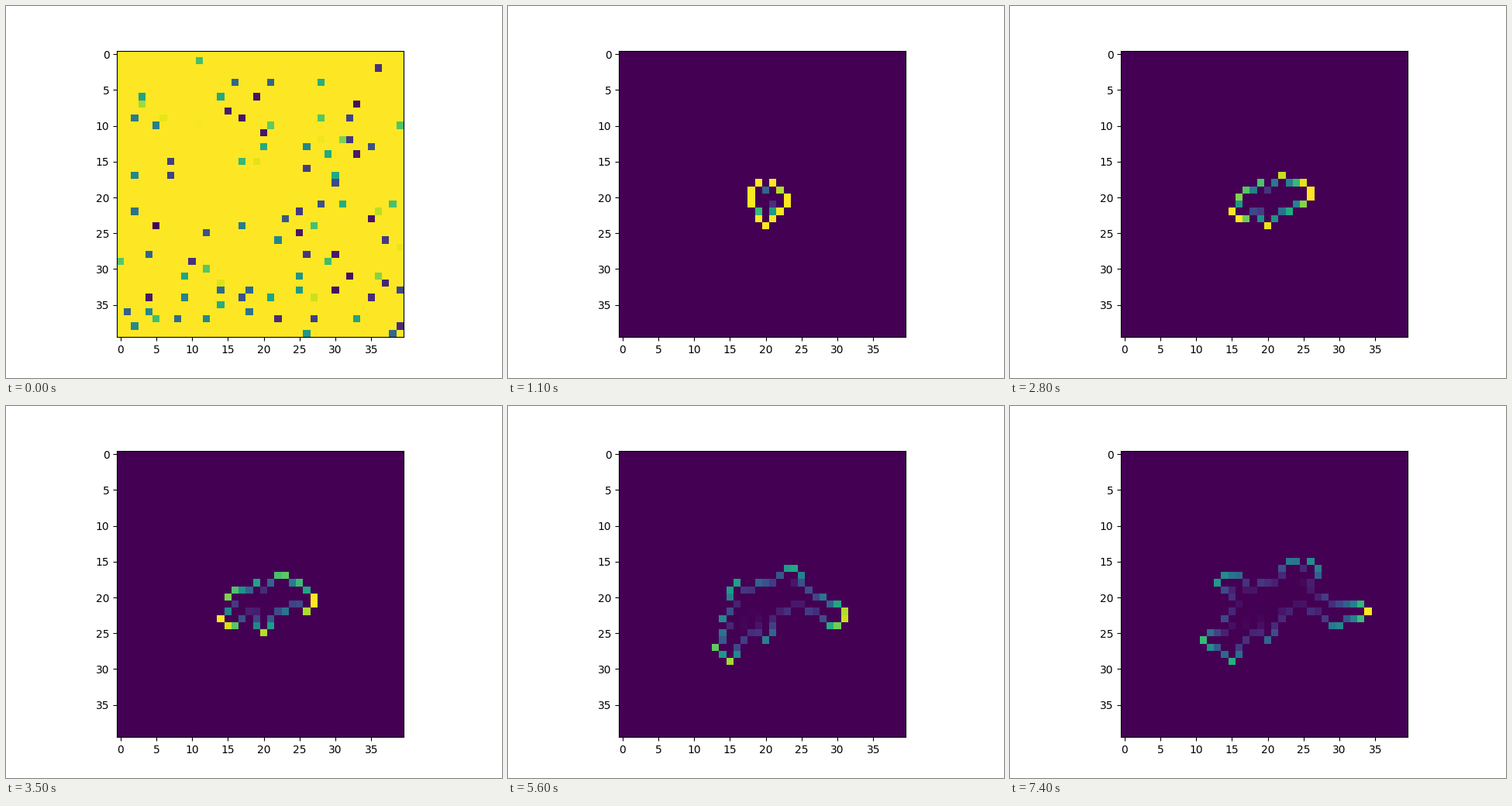
These frames come from a looping animation (640x480 px, 7.5 s). A matplotlib script:

```python
import numpy as np
import matplotlib.pyplot as plt
from matplotlib.animation import FuncAnimation

# Dielectric breakdown growth: each cell next to the cluster is coloured
# by its chance of being the next one to join.
SIZE = 40
FRAMES = 75
VMAX = 0.06

# Limbs of the cluster: first frame, last frame, then the (column, row)
# corners that the limb passes at an even pace.
LIMBS = [
    (1, 10, (20, 20), (20, 23)),
    (2, 22, (21, 20), (22, 21), (23, 20), (24, 20)),
    (7, 31, (19, 20), (16, 20)),
    (9, 33, (19, 21), (17, 22), (16, 23), (15, 23)),
    (10, 47, (19, 19), (20, 19)),
    (11, 54, (21, 19), (25, 20), (26, 21), (28, 22), (30, 23), (29, 23)),
    (15, 73, (21, 22), (21, 23)),
    (27, 72, (22, 18), (23, 17), (26, 16)),
    (33, 37, (20, 24), (20, 25)),
    (40, 55, (16, 24), (16, 26), (15, 28)),
    (44, 48, (17, 25), (15, 25)),
    (56, 65, (16, 19), (16, 18), (14, 18)),
    (56, 70, (14, 27), (14, 26), (12, 26)),
    (57, 73, (31, 22), (33, 22)),
    (65, 68, (23, 16), (24, 16)),
]


def walk(corners):
    """Cells from corner to corner, across first and then down or up."""
    x, y = corners[0]
    cells = [(x, y)]
    for end_x, end_y in corners[1:]:
        while (x, y) != (end_x, end_y):
            if x != end_x:
                x += np.sign(end_x - x)
            else:
                y += np.sign(end_y - y)
            cells.append((x, y))
    return cells


def join_times():
    """Grid of the moments at which cells join the cluster."""
    joined = np.full((SIZE, SIZE), np.inf)
    for start, end, *corners in LIMBS:
        cells = walk(corners)
        for (x, y), t in zip(cells, np.linspace(start, end, len(cells))):
            joined[y, x] = min(joined[y, x], t)
    return joined


def green(m):
    """Inverse of the Laplacian on an m x m grid with a fixed rim."""
    line = 2 * np.eye(m) - np.eye(m, k=1) - np.eye(m, k=-1)
    eye = np.eye(m)
    return np.linalg.inv(np.kron(line, eye) + np.kron(eye, line))


INNER = SIZE - 2
G = green(INNER)
joined = join_times()


def potential(cluster):
    """Field that is 0 on the cluster and 1 on the rim."""
    ids = np.flatnonzero(cluster[1:-1, 1:-1])
    charge = np.linalg.solve(G[np.ix_(ids, ids)], np.ones(len(ids)))
    phi = 1 - G[:, ids] @ charge
    return np.pad(phi.reshape(INNER, INNER), 1, constant_values=1)


def growth_chance(frame):
    cluster = joined <= frame
    near = np.zeros_like(cluster)
    for axis in (0, 1):
        for step in (-1, 1):
            near |= np.roll(cluster, step, axis)
    chance = np.where(near & ~cluster, potential(cluster), 0).clip(0)
    return chance / chance.sum()


noise = np.random.default_rng(4).random((SIZE, SIZE))

fig, ax = plt.subplots(figsize=(6.4, 4.8), dpi=100)
image = ax.imshow(noise, cmap="viridis", vmin=0, vmax=VMAX)


def update(frame):
    image.set_data(growth_chance(frame) if frame else noise)
    return [image]


anim = FuncAnimation(fig, update, frames=FRAMES, interval=100,
                     repeat=True, repeat_delay=0)
plt.show()
```
